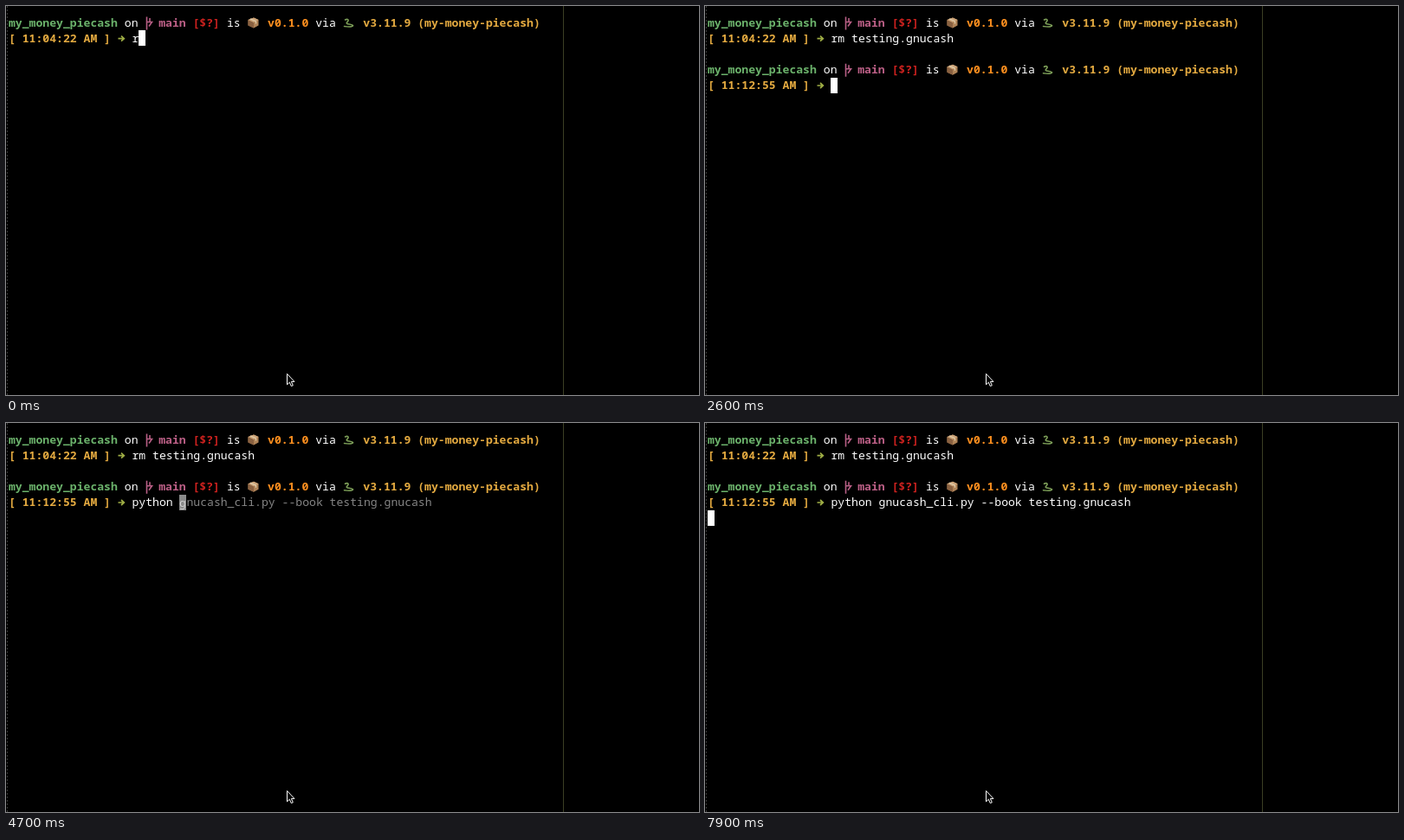
These frames come from a looping animation (800 px wide and 450 px high, 8000 ms). An HTML page:

```html
<!DOCTYPE html>
<html lang="en">
<head>
<meta charset="utf-8">
<title>Terminal session</title>
<style>
  html, body { margin: 0; width: 100%; height: 100%; overflow: hidden; background: #000; }
  svg { display: block; width: 800px; height: 450px; }
  text { font: 500 13.12px "Noto Sans Mono", "DejaVu Sans Mono", monospace; white-space: pre; fill: #fff; }
  .b { font-weight: 700; }
  .dir { fill: #6bb26b; }
  .branch { fill: #bd6087; }
  .status { fill: #d0221f; }
  .version { fill: #ff901f; }
  .gold { fill: #e4aa40; }
  .ghost { fill: #858585; }
</style>
</head>
<body>
<svg viewBox="0 0 800 450">
  <defs>
    <g id="prompt">
      <text class="b dir" x="3" y="24">my_money_piecash</text>
      <text x="136.8" y="24">on</text>
      <path d="M162.5 12.5V27.5M162.5 18.5H168.5L165 23.5M166 14V18" fill="none" stroke="#b85f85" stroke-width="1.6"/>
      <text class="b branch" x="176.2" y="24">main</text>
      <text class="b status" x="215.5" y="24">[$?]</text>
      <text x="254.9" y="24">is</text>
      <path d="M279.5 16L286 13.5L291.5 16V22.5L286 25.5L279.5 22.5Z" fill="#b08458"/>
      <path d="M279.5 16L286 19V25.5L279.5 22.5Z" fill="#8a6140"/>
      <path d="M279.5 16L286 13.5L291.5 16L286 19Z" fill="#cda57a"/>
      <path d="M282 14.8L288.5 17.8V20.5" fill="none" stroke="#e2cfae" stroke-width="1.2"/>
      <text class="b version" x="302.1" y="24">v0.1.0</text>
      <text x="357.2" y="24">via</text>
      <path d="M391.5 16C394.5 14.5 396.5 16 394 18.5C391 22 398 20 400.5 22.5C400 24.5 394 24 390.5 23.5" fill="none" stroke="#7d9f58" stroke-width="1.6" stroke-linecap="round"/>
      <text class="b gold" x="412.3" y="24">v3.11.9 (my-money-piecash)</text>
    </g>
    <path id="arrow" d="M129.5 37.7H135M133 34.7L136.3 37.7L133 40.7" fill="none" stroke="#9fae45" stroke-width="1.7"/>
  </defs>
  <path d="M1.5 0V450" stroke="#3a3a3a" stroke-dasharray="2 2"/>
  <path d="M643.5 0V450" stroke="#3b3f24"/>

  <use href="#prompt"/>
  <text class="b gold" x="3" y="42">[ 11:04:22 AM ]</text>
  <use href="#arrow"/>

  <g id="second">
    <use href="#prompt" y="54.3"/>
    <text class="b gold" x="3" y="96.3">[ 11:12:55 AM ]</text>
    <use href="#arrow" y="54.3"/>
  </g>

  <rect id="cursor" width="8" height="18"/>
  <text x="145.5" y="42"><tspan id="typed1"></tspan><tspan id="ghost1" class="ghost"></tspan></text>
  <text x="145.5" y="96.3"><tspan id="typed2"></tspan><tspan id="ghost2" class="ghost"></tspan></text>
  <text id="under"></text>
  <path d="M324.5 425.5V438L327.3 435.3L329.3 439.8L331.3 438.9L329.4 434.6H333Z" fill="#000" stroke="#fff"/>
</svg>
<script>
const LOOP = 8000, CELL = 7.872, LEFT = 3, START = 18;
const $ = id => document.getElementById(id);
const rowTop = row => Math.round(10 + row * 18.15);

const remove = "rm testing.gnucash", run = "python gnucash_cli.py --book testing.gnucash";

function show(n, typed, rest) {
  $("typed" + n).textContent = typed;
  $("ghost" + n).textContent = rest;
}

function placeCursor(row, col, hidden = "") {
  const x = Math.round(LEFT + col * CELL), cursor = $("cursor"), under = $("under");
  cursor.setAttribute("x", x);
  cursor.setAttribute("y", rowTop(row));
  cursor.setAttribute("fill", hidden ? "#8a8a8a" : "#fff");
  under.textContent = hidden;
  under.setAttribute("x", x);
  under.setAttribute("y", rowTop(row) + 13.9);
  under.style.fill = "#d0d0d0";
}

// The suggestion's first letter sits under the block cursor.
function type(n, row, line, suggestion, count) {
  const rest = suggestion.slice(count);
  show(n, line.slice(0, count), rest && " " + rest.slice(1));
  placeCursor(row, START + count, rest[0]);
}

function draw(t) {
  const prompted = t >= 2500;
  $("second").style.display = prompted ? "" : "none";
  show(2, "", "");
  if (t < 2200) {
    const count = Math.min(remove.length, 1 + Math.floor(t / 100));
    type(1, 1, remove, count > 1 ? remove + ".2*" : "", count);
    return;
  }
  show(1, remove, "");
  if (!prompted) placeCursor(2, 0);
  else if (t < 4100) placeCursor(4, START);
  else if (t < 5700) {
    const count = t < 5100 ? 1 + Math.floor((t - 4100) / 100) : run.length;
    type(2, 4, run, run, count);
  } else {
    show(2, run, "");
    placeCursor(5, 0);
  }
}

const began = performance.now();
function tick() {
  draw((performance.now() - began) % LOOP);
  requestAnimationFrame(tick);
}
tick();
</script>
</body>
</html>
```
